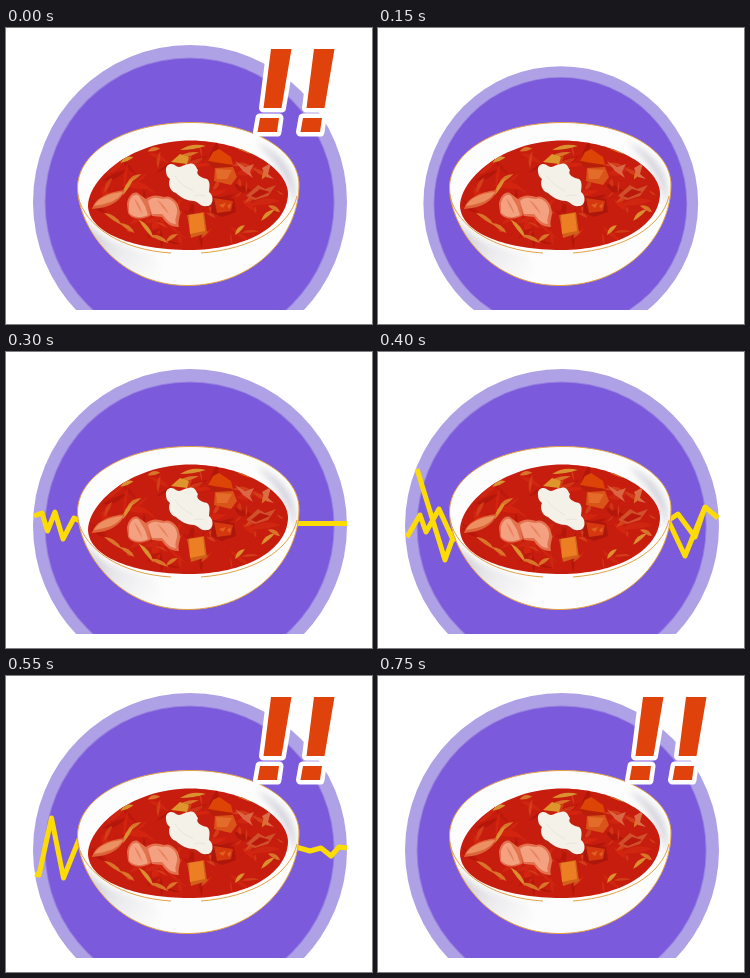
An HTML page with a canvas for the animation above (1 s loop, 366x296 px).

```html
<!DOCTYPE html>
<html lang="en">
<head>
<meta charset="utf-8">
<title>Soup</title>
<style>
html, body { margin: 0; width: 100%; height: 100%; overflow: hidden; background: #fff; }
canvas { display: block; }
</style>
</head>
<body>
<canvas id="stage" width="366" height="296"></canvas>
<script>
const W = 366, H = 296, LOOP = 1000, STEP = 50;
const ctx = document.getElementById('stage').getContext('2d');
const bowl = document.createElement('canvas');
bowl.width = W;
bowl.height = H;

const BODY = new Path2D('M71.5 160C73 202 114 257.5 181 257.5C250 257.5 293 206 293 157C293 121 245 94.5 185 94.5C120 94.5 71.5 123 71.5 160Z');
const SOUP = new Path2D('M82 178C82 152 124 112.5 185 112.5C238 113 282 140 282 166C281 199 238 222 183 222C130 222 83 206 82 178Z');
const RIM = new Path2D('M72 168C79 199 116 222 165 225M195 225C246 221 284 199 291 168');

function random(seed) {
  return () => (seed = (seed * 16807) % 2147483647) / 2147483647;
}

function paint(c, color, ...shapes) {
  c.fillStyle = color;
  shapes.forEach(d => c.fill(new Path2D(d)));
}

// A tapered, bent brush mark.
function streak(c, x, y, len, width, angle, color) {
  c.save();
  c.translate(x, y);
  c.rotate(angle);
  c.fillStyle = color;
  c.beginPath();
  c.moveTo(-len / 2, 0);
  c.quadraticCurveTo(0, -width * 1.5, len / 2, 0);
  c.quadraticCurveTo(0, width * 0.5, -len / 2, 0);
  c.fill();
  c.restore();
}

function scatter(c, rnd, count, colors, len, width) {
  for (let i = 0; i < count; i++) {
    const a = rnd() * Math.PI * 2, r = Math.sqrt(rnd());
    streak(c, 182 + Math.cos(a) * r * 96, 168 + Math.sin(a) * r * 50,
      len * (0.5 + rnd()), width * (0.5 + rnd()), rnd() * 6.3,
      colors[Math.floor(rnd() * colors.length)]);
  }
}

function drawSoup(c) {
  const rnd = random(731);
  c.save();
  c.clip(SOUP);
  c.fillStyle = '#c71d0e';
  c.fillRect(0, 0, W, H);
  c.filter = 'blur(0.7px)';
  scatter(c, rnd, 50, ['#b3170a', '#bb190c', '#cf2611', '#d2240f'], 22, 5);
  scatter(c, rnd, 24, ['#d23d1a', '#d64c20', '#d03416'], 13, 3);

  // Cabbage and herbs
  [
    [121, 132, 14, -0.4], [148, 122, 13, -0.2], [181, 128, 25, -0.3], [187, 120, 26, -0.15],
    [242, 124, 22, 0.3], [128, 151, 18, -0.6], [122, 159, 20, -1], [107, 191, 22, 0.6],
    [121, 200, 18, 0.6], [140, 201, 24, 0.9], [153, 211, 20, 0.4], [166, 210, 14, -0.6],
    [262, 187, 18, -0.7], [268, 181, 14, 0.5], [258, 145, 14, 1.9], [234, 202, 14, -0.8]
  ].forEach(([x, y, len, a], i) =>
    streak(c, x, y, len, 4, a, i % 3 ? '#d9752a' : '#d9922f'));

  // Vegetables
  paint(c, '#dd4507', 'M202 133L207 124L213 121L225 129L227 137Z');
  paint(c, '#b6200a', 'M202 134L226 137L224 141L206 139Z');
  paint(c, '#d95419', 'M209 140L227 139L231 149L225 157L208 153Z');
  paint(c, '#e46c2b', 'M210 141L226 142L221 151L211 151Z');
  paint(c, '#ad170b', 'M207 168L228 171L230 184L216 189L205 184Z');
  paint(c, '#d5380e', 'M208 170L227 173L225 183L211 185Z');
  paint(c, '#e06022', 'M213 177L220 175L217 180Z', 'M221 178L225 175L224 181Z');
  paint(c, '#d0601a', 'M181 187L198 184L201 205L185 210Z');
  paint(c, '#ec7f24', 'M183 187L197 185L199 203L184 206Z');
  paint(c, '#dd952c', 'M165 134L174 126L183 129L181 136Z');
  paint(c, '#d0502c', 'M240 168L252 157L259 161L270 157L262 168L249 172Z');
  paint(c, '#bb180c', 'M245 168L254 161L264 164L250 170Z');
  paint(c, '#db6645', 'M229 133L239 139L248 136L244 144L247 150L237 143Z');
  paint(c, '#db6c45', 'M256 140L265 135L262 146L268 151L260 149Z');

  // Meat
  paint(c, '#dd6439', 'M86 181C88 172 99 164 119 162C115 173 104 180 86 181Z');
  paint(c, '#ec9062', 'M88 178C92 170 103 165 117 164C112 173 101 176 88 178Z');
  paint(c, '#e2714e', 'M121 176C122 167 129 162 133 166L140 171L145 187C138 192 126 192 122 185Z');
  paint(c, '#f3a180', 'M123 175C125 167 130 165 133 168L139 178L142 187C134 191 126 189 123 184Z');
  paint(c, '#e2714e', 'M139 172C147 165 153 168 158 169C165 166 173 175 173 180C176 187 171 192 173 199C164 199 159 194 156 189L146 188Z');
  paint(c, '#f3a180', 'M142 173C148 167 153 171 158 171C164 169 170 175 171 181C172 187 168 190 170 196C163 196 160 190 156 186L146 186Z');
  streak(c, 132, 178, 18, 2, 1.1, '#e9825f');
  streak(c, 157, 179, 20, 2, 0.9, '#e9825f');

  // Cream
  paint(c, '#bb2412', 'M160 147C161 162 166 171 176 172C188 175 193 182 205 179L208 169Z');
  c.filter = 'none';
  paint(c, '#f4f1e8', 'M160 143C159 136 166 134 170 138C175 141 177 136 183 136C189 134 190 140 192 142C189 147 196 150 201 151C205 154 203 160 203 164C208 167 208 178 201 178C194 179 193 174 188 173C182 173 175 170 170 165C163 163 162 154 164 151C161 149 160 146 160 143Z');
  c.strokeStyle = '#e8e5da';
  c.stroke(new Path2D('M169 148Q175 157 187 163M188 168Q194 166 199 168'));
  c.restore();
}

// Soft grey inside the right wall and along the lower left.
function drawShade(c) {
  c.filter = 'blur(3px)';
  paint(c, 'rgba(190,186,200,.65)', 'M250 114C282 128 294 152 288 178C286 160 276 138 250 114Z');
  const g = c.createLinearGradient(78, 195, 150, 255);
  g.addColorStop(0, 'rgba(175,170,182,.8)');
  g.addColorStop(0.4, 'rgba(205,202,208,.5)');
  g.addColorStop(1, 'rgba(225,222,228,0)');
  c.fillStyle = g;
  c.fill(new Path2D('M72 178C82 205 105 217 150 227L165 262L110 262Z'));
  c.filter = 'none';
}

function drawBowl(c) {
  c.save();
  c.clip(BODY);
  c.fillStyle = '#fdfdfd';
  c.fillRect(0, 0, W, H);
  drawShade(c);
  c.restore();
  drawSoup(c);
  c.strokeStyle = '#e2a145';
  c.lineWidth = 1;
  c.stroke(BODY);
  c.stroke(RIM);
}

function disc(x, y, r, color) {
  ctx.fillStyle = color;
  ctx.beginPath();
  ctx.arc(x, y, r, 0, Math.PI * 2);
  ctx.fill();
}

function drawDisc(scale) {
  ctx.save();
  ctx.beginPath();
  ctx.rect(0, 0, W, 282);
  ctx.clip();
  // Grows from a point a little below and left of its centre.
  ctx.translate(174, 186);
  ctx.scale(scale, scale);
  disc(10, -12, 157, '#afa1e5');
  disc(9.6, -11.6, 145, '#9780e0');
  disc(9.6, -11.6, 144, '#7b5adb');
  ctx.restore();
}

const LEFT = {
  jag: 'M28 164L36 161L41.5 179L49 160L57 187L68 166L76 170',
  cross: 'M39 117L67 208L77 180M29 185L42 163L48 180L61 157L76 190',
  tall: 'M29 198L33 199L45.5 142L57.5 202L74 161'
};
const RIGHT = {
  flat: 'M290 171.5H341',
  cross: 'M291 170L307 204L327 155L340 166M291 168L300 162L317 185L327 155',
  wave: 'M290 171L304 175L315 172L325 180L333 171L341 172'
};
// One pulse per step, from 300 ms.
const PULSES = [
  ['jag', 'flat'], ['jag', 'wave'], ['cross', 'cross'], ['cross', 'cross'], ['tall', 'cross'],
  ['tall', 'wave'], ['tall', 'wave'], ['jag', 'wave'], ['jag', 'flat']
];

function drawPulse([left, right]) {
  ctx.strokeStyle = '#fddc05';
  ctx.lineWidth = 5;
  ctx.lineJoin = 'round';
  ctx.stroke(new Path2D(LEFT[left]));
  ctx.stroke(new Path2D(RIGHT[right]));
}

const MARK = new Path2D('M265 21H285.5L275.5 80H257.5ZM254 90H273L271 104H251.5Z');

function drawMarks() {
  ctx.lineJoin = 'round';
  ctx.lineWidth = 9;
  ctx.strokeStyle = '#fff';
  ctx.fillStyle = '#df430b';
  for (const dx of [0, 43]) {
    ctx.save();
    ctx.translate(dx, 0);
    ctx.stroke(MARK);
    ctx.fill(MARK);
    ctx.restore();
  }
}

function discScale(t) {
  if (t < 50 || t >= 200) return 1;
  return t < 100 ? 0 : t < 150 ? 0.6 : 0.875;
}

function draw() {
  const t = Math.floor((performance.now() % LOOP) / STEP) * STEP;
  ctx.fillStyle = '#fff';
  ctx.fillRect(0, 0, W, H);
  const scale = discScale(t);
  if (scale) drawDisc(scale);
  const pulse = PULSES[(t - 300) / STEP];
  if (pulse) drawPulse(pulse);
  ctx.drawImage(bowl, 0, 0);
  if (t < 50 || (t >= 500 && t !== 650)) drawMarks();
  requestAnimationFrame(draw);
}

drawBowl(bowl.getContext('2d'));
draw();
</script>
</body>
</html>
```
